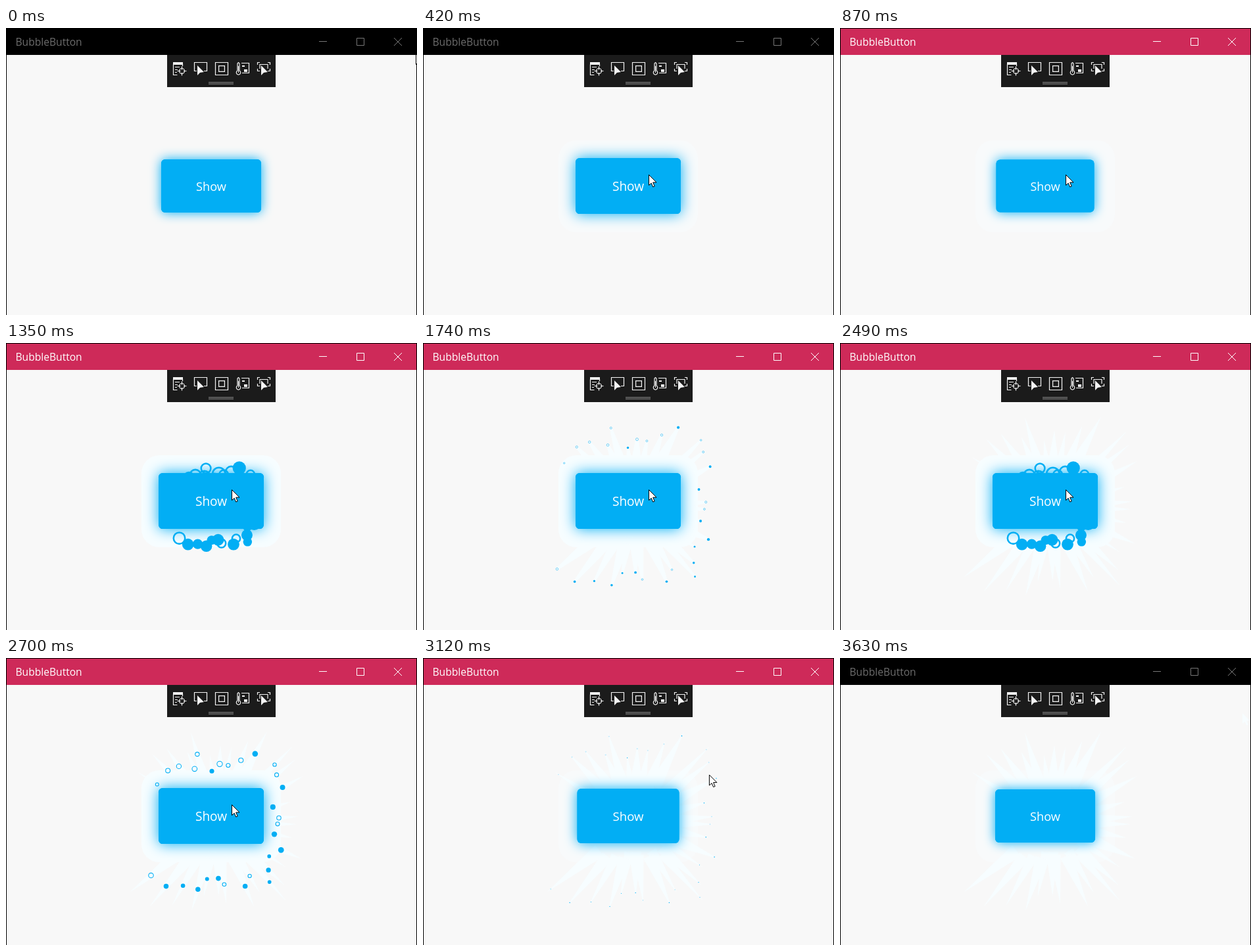
An HTML page with a canvas for the animation above (3.75 s loop, 625 px wide and 437 px high).

```html
<!DOCTYPE html>
<html lang="en">
<head>
<meta charset="utf-8">
<title>BubbleButton</title>
<style>
html, body { margin: 0; width: 100%; height: 100%; overflow: hidden; background: #f8f8f8; }
canvas { display: block; }
</style>
</head>
<body>
<canvas id="stage" width="625" height="437"></canvas>
<script>
const ctx = document.getElementById('stage').getContext('2d');
const LOOP = 3750, STEP = 30;
const BLUE = '#02aef4', PALE = '#f7fdff', FONT = '"Open Sans", "Noto Sans", sans-serif';
const CENTER = { x: 312, y: 240.5 }, ORIGIN = { x: 322, y: 251 };
const HOVER = 1.05, PRESSED = 0.95;
const ENTER = 240, PRESS = [780, 1950], RELEASE = [1200, 2340], EXIT = 3060;
const BURST_DELAY = 30;

const clamp = v => Math.min(1, Math.max(0, v));
const progress = (t, start, length) => clamp((t - start) / length);
const easeOut = u => 1 - (1 - u) * (1 - u);
const mix = (a, b, u) => a + (b - a) * u;
const remaining = age => Math.exp(-0.00405 * age - 0.09);

function noise(n) {
  const v = Math.sin(n * 127.1) * 43758.5453;
  return v - Math.floor(v);
}

// Bubbles fan out around the button, farther on the diagonals, with a gap on the left
const COUNT = 30;
const bubbles = Array.from({ length: COUNT }, (_, i) => {
  const angle = mix(-2.55, 2.43, i / (COUNT - 1)) + 0.15 * (noise(i + 1) - 0.5);
  const reach = (118 + 55 * Math.abs(Math.sin(2 * angle))) * mix(0.72, 1, noise(i + 51));
  return {
    cos: Math.cos(angle), sin: Math.sin(angle), reach,
    r: mix(11, 21, noise(i + 101)),
    solid: noise(i + 151) > 0.57
  };
});

function rect(x, y, w, h, color) {
  ctx.fillStyle = color;
  ctx.fillRect(x, y, w, h);
}

function roundRect(cx, cy, w, h, r) {
  ctx.beginPath();
  ctx.roundRect(cx - w / 2, cy - h / 2, w, h, r);
  ctx.fill();
}

function stroke(path, color, width) {
  ctx.strokeStyle = color;
  ctx.lineWidth = width;
  ctx.stroke(new Path2D(path));
}

function label(text, x, y, size, align, color) {
  ctx.font = `${size}px ${FONT}`;
  ctx.textAlign = align;
  ctx.fillStyle = color;
  ctx.fillText(text, x, y);
}

function titleBar(active) {
  const ink = active ? '#fff' : '#777';
  rect(0, 0, 625, 41, '#000');
  if (active) rect(1, 1, 623, 40, '#ce2a59');
  rect(0, 41, 1, 396, '#000');
  rect(624, 41, 1, 396, '#000');
  label('BubbleButton', 14.5, 27, 15.6, 'left', active ? '#fff' : '#6c6c6c');
  stroke('M476 20.5h12M533.5 15.5h11v11h-11z', ink, 1);
  stroke('M590 15l12 12M602 15l-12 12', ink, 1);
}

// Each icon is a 20 px square: thin outlines, then solid parts
const ARROW = 'v15l4-4 6-1z';
const icons = [
  ['M.5 3v16.5h6M14.5 3v3M3 7.5h7M3 11.5h4M3 15.5h3M13.5 6.5v5M13.5 16v4.5M6.5 13.5h5M16 13.5h4.5M9.5 13.5a4 4 0 1 0 8 0a4 4 0 1 0-8 0', 'M0 0h15v4H0z'],
  ['M4 13.5H.5V.5h19v13H15', 'M5 5' + ARROW],
  ['M.5.5h19v19H.5zM5.6 5.6h8.8v8.8H5.6z', ''],
  ['M2 13V2l1.5-1.5L5 2v11a3.2 3.2 0 1 1-3 0M8 1.5h11.5v15H9', 'M3 6h1v10H3zM9 5h4v2H9zM12 11h5v4h-5z'],
  ['M.5 4V.5H4M16 .5h3.5V4M.5 10v3.5H4M16 13.5h3.5V10M4 10V3.5h12V10', 'M6 5' + ARROW]
];

function toolbar() {
  rect(245, 41, 165, 49, '#1b1b1b');
  icons.forEach(([outline, solid], i) => {
    ctx.save();
    ctx.translate(254 + 32 * i, 52);
    stroke(outline, '#f4f4f4', 1.2);
    ctx.fillStyle = '#f4f4f4';
    ctx.fill(new Path2D(solid));
    ctx.restore();
  });
  rect(308, 82, 38, 4, '#444');
  stroke('M308 82.5h38M308 85.5h38', '#6a6a6a', 1);
}

function halo(t) {
  if (t < 300) return;
  ctx.globalAlpha = t < RELEASE[0] || t > EXIT ? 0.4 : 1;
  ctx.fillStyle = PALE;
  roundRect(312, 241, 212, 140, 27);
  ctx.globalAlpha = 1;
}

// Pale wakes: a cone along each bubble's path that narrows to its end point
function wakes(age) {
  if (age < 0) return;
  const q = age > 870 ? 0 : remaining(age);
  ctx.fillStyle = PALE;
  for (const { cos, sin, reach, r } of bubbles) {
    ctx.beginPath();
    for (const [left, side] of [[0.6, 1], [q, 1], [q, -1], [0.6, -1]]) {
      const along = reach * (1 - left), across = r * left * side;
      ctx.lineTo(ORIGIN.x + cos * along - sin * across, ORIGIN.y + sin * along + cos * across);
    }
    ctx.fill();
  }
}

function burst(age) {
  if (age < 0 || age > 780) return;
  const q = remaining(age), line = 4.5 * q;
  ctx.fillStyle = ctx.strokeStyle = BLUE;
  ctx.lineWidth = line;
  for (const { cos, sin, reach, r, solid } of bubbles) {
    const along = reach * (1 - q);
    ctx.beginPath();
    ctx.arc(ORIGIN.x + cos * along, ORIGIN.y + sin * along,
      r * q - (solid ? 0 : line / 2), 0, Math.PI * 2);
    solid ? ctx.fill() : ctx.stroke();
  }
}

function buttonScale(t) {
  let scale = mix(1, HOVER, easeOut(progress(t, ENTER, 150)));
  PRESS.forEach((start, i) => {
    scale = mix(scale, PRESSED, easeOut(progress(t, start, 210)));
    scale = mix(scale, HOVER, easeOut(progress(t, RELEASE[i], 150)));
  });
  return mix(scale, 1, easeOut(progress(t, EXIT, 180)));
}

function buttonShape(scale) {
  ctx.fillStyle = BLUE;
  roundRect(CENTER.x, CENTER.y, Math.round(152 * scale), Math.round(81 * scale), 6 * scale);
}

function pointer(x, y, fill, outline) {
  const shape = 'M0 0v16l3.7-3.3 2.5 5.8 2.5-1-2.5-5.9h5.3z';
  ctx.save();
  ctx.translate(x, y);
  ctx.fillStyle = fill;
  ctx.fill(new Path2D(shape));
  if (outline) stroke(shape, outline, 1);
  ctx.restore();
}

function cursor(t) {
  if (t >= 3300) {
    pointer(612, 84, PALE);
    return;
  }
  // curved way in, straight way out
  const u = easeOut(progress(t, 0, 420));
  const leave = progress(t, 2880, 420) ** 2;
  const x = mix(mix(623.5, 490, u), mix(490, 343.5, u), u);
  const y = mix(mix(39.5, 60, u), mix(60, 223.5, u), u);
  pointer(mix(x, 625, leave), mix(y, 84, leave), '#fff', '#000');
}

function draw(t) {
  const scale = buttonScale(t);
  const bursts = RELEASE.map(start => t - start - BURST_DELAY);
  rect(0, 0, 625, 437, '#f8f8f8');
  halo(t);
  wakes(bursts[0]);

  ctx.shadowColor = BLUE;
  ctx.shadowBlur = 17 + 80 * Math.abs(scale - 1);
  buttonShape(scale);
  ctx.shadowBlur = 0;
  ctx.shadowColor = 'transparent';

  bursts.forEach(burst);
  buttonShape(scale);

  ctx.save();
  ctx.translate(CENTER.x, CENTER.y);
  ctx.scale(scale, scale);
  label('Show', 0, 7.3, 18.2, 'center', '#fff');
  ctx.restore();

  titleBar(t >= PRESS[0] && t < 3630);
  toolbar();
  cursor(t);
}

const began = performance.now();
function tick() {
  const t = (performance.now() - began) % LOOP;
  draw(Math.floor(t / STEP) * STEP);
  requestAnimationFrame(tick);
}
tick();
</script>
</body>
</html>
```
